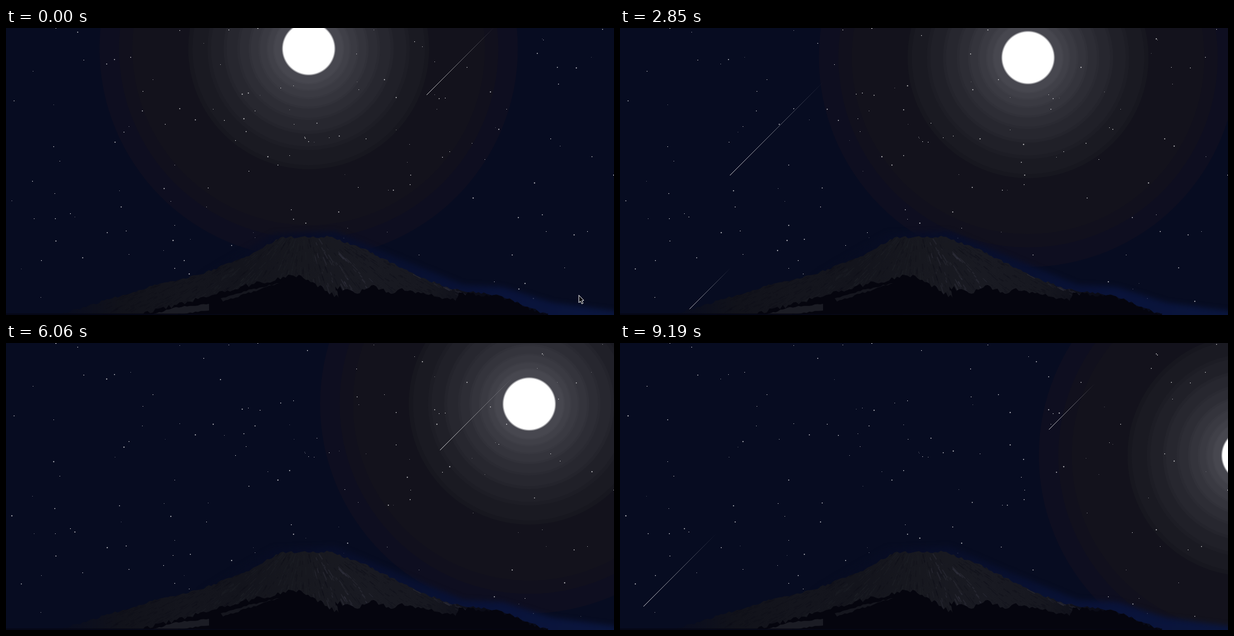
An HTML page with a canvas that plays this animation: 1090 by 514 pixels, repeating every 9290 ms.

```html
<!DOCTYPE html>
<html>
<head>
<meta charset="utf-8">
<title>Moonlit mountain</title>
<style>
  html, body { margin: 0; width: 100%; height: 100%; overflow: hidden; background: #070c21; }
  canvas { display: block; }
</style>
</head>
<body>
<canvas id="stage" width="1090" height="514"></canvas>
<script>
const W = 1090, H = 514, LOOP = 9290, HOLD = 178.3;
const STAR_COUNT = 165, METEOR_SPEED = .314;
const ctx = document.getElementById('stage').getContext('2d');

const rand = (a, b = 0) => {
  const v = Math.sin(a * 12.9898 + b * 78.233 + 4.1) * 43758.5453;
  return v - Math.floor(v);
};

// birth time, x where it enters at the top, tail length
const meteors = [
  [-382, 874, 122], [550, 841, 146], [1219, 628, 80], [2002, 461, 168],
  [3492, 367, 95], [4479, 1032, 108], [5441, 970, 130], [6361, 448, 154],
  [7024, 998, 112], [7687, 514, 130], [8696, 924, 82]
];

function trace(c, points, roughness = 0) {
  c.beginPath();
  for (let i = 0; i < points.length - 2; i += 2) {
    const [x, y, x2, y2] = points.slice(i, i + 4);
    const n = roughness ? Math.ceil(Math.hypot(x2 - x, y2 - y) / 5) : 1;
    for (let j = 0; j <= n; j++) {
      const wobble = j % n ? (rand(x + j, y) - .5) * roughness : 0;
      c.lineTo(x + (x2 - x) * j / n, y + (y2 - y) * j / n + wobble);
    }
  }
}

function gradient(c, x1, y1, x2, y2, ...colors) {
  const g = c.createLinearGradient(x1, y1, x2, y2);
  colors.forEach((color, i) => g.addColorStop(i / (colors.length - 1), color));
  return g;
}

function makeMountain() {
  const layer = document.createElement('canvas');
  layer.width = W;
  layer.height = H;
  const c = layer.getContext('2d');
  const fill = (points, color, roughness) => {
    trace(c, points, roughness);
    c.fillStyle = color;
    c.fill();
  };

  // blue haze behind the ridge
  c.filter = 'blur(5px)';
  fill([340,446, 480,368, 590,364, 700,411, 820,460, 890,464, 980,492, 1100,508, 1100,530, 340,530],
    gradient(c, 340, 0, W, 0, '#070c2100', '#080d26', '#081030', '#09133a', '#0a163e'));
  c.filter = 'none';

  c.save();
  fill([100,512, 262,462, 350,441, 440,405, 492,375, 580,374, 640,395, 740,445, 800,468, 885,479, 972,514],
    gradient(c, 100, 0, 972, 0, '#080c1f', '#11121a', '#14151d', '#13141c', '#17181f',
      '#191a22', '#171820', '#090a15', '#080b1c'), 4);
  c.clip();

  // rock and snow running down from the summit
  for (let i = 0; i < 1300; i++) {
    const x = 170 + rand(i, 5) * 650, y = 374 + rand(i, 6) * 130;
    const angle = Math.atan2(y - 335, x - 535), length = 3 + rand(i, 7) * 14;
    const lit = rand(Math.floor(angle * 22), 8) > .5;
    c.strokeStyle = !lit ? '#0d0e1748' : x > 550 ? '#3a3a4660' : '#22232c50';
    c.lineWidth = .7 + rand(i, 9) * 1.3;
    c.beginPath();
    c.moveTo(x, y);
    c.lineTo(x + Math.cos(angle) * length, y + Math.sin(angle) * length);
    c.stroke();
  }

  // dark woods at the foot
  fill([225,516, 330,490, 440,459, 525,442, 597,484, 590,463, 630,476, 655,461, 690,476,
    710,466, 806,489, 814,474, 885,480, 975,516], '#05050e', 8);
  fill([262,514, 300,501, 364,494, 364,506, 300,514], '#1b1c24', 2);
  fill([389,490, 430,476, 490,457, 440,468, 385,484], '#15161e', 3);
  c.restore();
  c.fillStyle = '#06061299';
  c.fillRect(0, 511, 972, 3);
  return layer;
}

const mountain = makeMountain();

function disc(x, y, radius, fill) {
  ctx.fillStyle = fill;
  ctx.beginPath();
  ctx.arc(x, y, radius, 0, 2 * Math.PI);
  ctx.fill();
}

function moonAt(t) {
  const angle = 6e-5 * t - .0008;
  return [543.5 + 1113 * Math.sin(angle), 1150 - 1113 * Math.cos(angle)];
}

function drawHalo(x, y) {
  disc(x, y, 375, '#0e0e20');
  disc(x, y, 340, '#11101d');
  disc(x, y, 316, '#13121c');
  // each ring is narrower and lighter, with a half-tone rim
  for (let i = 0; i < 8; i++) {
    const radius = 216 * .84 ** i, level = 26 + 6.4 * i;
    disc(x, y, radius, `rgb(${level - 3} ${level - 3} ${level + 5})`);
    disc(x, y, radius * .965, `rgb(${level} ${level} ${level + 8})`);
  }
}

function drawMoon(x, y) {
  const glow = ctx.createRadialGradient(x, y, 43.5, x, y, 48.5);
  glow.addColorStop(0, '#fff');
  glow.addColorStop(.35, '#fff');
  glow.addColorStop(1, '#ffffff00');
  disc(x, y, 48.5, glow);
}

function drawStars(step) {
  ctx.fillStyle = '#fff';
  for (let i = 0; i < STAR_COUNT; i++) {
    const x = Math.floor(rand(i, 1) * W), y = Math.floor(rand(i, 2) * H);
    const size = .5 + 1.2 * rand(i, step + 20);
    ctx.fillRect(x + .5 - size / 2, y + .5 - size / 2, size, size);
  }
}

function drawMeteors(t) {
  ctx.lineWidth = 1;
  for (const [birth, entry, length] of meteors) {
    const y = (t - birth) * METEOR_SPEED, x = entry - y;
    if (y < 0 || y > H + length) continue;
    ctx.strokeStyle = gradient(ctx, x, y, x + length, y - length, '#ffffffc8', '#ffffff00');
    ctx.beginPath();
    ctx.moveTo(x, y);
    ctx.lineTo(x + length, y - length);
    ctx.stroke();
  }
}

function drawCursor() {
  trace(ctx, [1027,478.5, 1027,492, 1030,489.3, 1032.3,494, 1034.6,493, 1032.4,488.3, 1036,488, 1027,478.5]);
  ctx.fillStyle = '#05050c';
  ctx.fill();
  ctx.strokeStyle = '#fff';
  ctx.lineWidth = 1;
  ctx.stroke();
}

// The picture is held in even steps; the last change comes late.
function heldTime(time) {
  if (time >= 9190) return 9190;
  const step = Math.min(50, Math.floor((time + 10) / HOLD));
  return Math.max(0, step * HOLD - 10);
}

function draw(now) {
  const t = heldTime(now % LOOP);
  const [x, y] = moonAt(t);
  ctx.fillStyle = '#070c21';
  ctx.fillRect(0, 0, W, H);
  drawHalo(x, y);
  drawStars(Math.round(t / HOLD));
  drawMoon(x, y);
  drawMeteors(t);
  ctx.drawImage(mountain, 0, 0);
  if (t === 0) drawCursor();
}

const begin = performance.now();
function loop() {
  draw(performance.now() - begin);
  requestAnimationFrame(loop);
}
loop();
</script>
</body>
</html>
```
